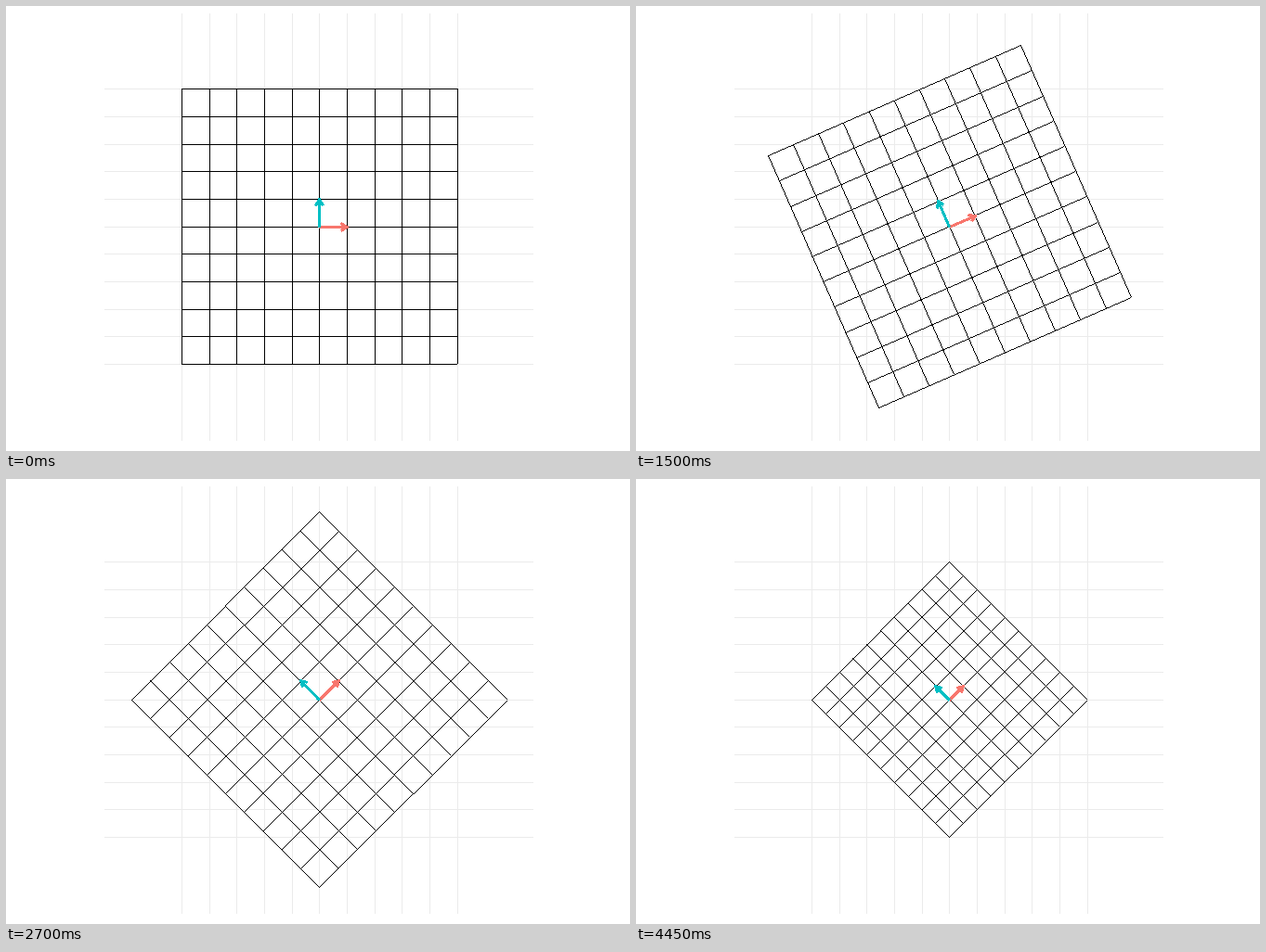
These frames come from a looping animation (672 by 480 pixels, 5000 ms). A matplotlib script:

```python
import numpy as np
import matplotlib.pyplot as plt
from matplotlib.animation import FuncAnimation
from matplotlib.patches import PathPatch
from matplotlib.path import Path

W, H = 672, 480
FRAMES, INTERVAL = 100, 50
CENTER = np.array([337.83, 238.17])
UNIT = 29.678            # pixels per grid unit
HEAD = 7.56              # arrow head arm length in pixels
REACH = 5                # grid runs from -REACH to REACH
STEPS = 40               # frames per motion phase

fig = plt.figure(figsize=(W / 96, H / 96), dpi=96, facecolor="white")
ax = fig.add_axes([0, 0, 1, 1])
ax.set(xlim=(0, W), ylim=(H, 0))
ax.axis("off")


def layer(color):
    patch = PathPatch(Path([(0, 0)]), facecolor=color, edgecolor="none",
                      linewidth=0, snap=False)
    return ax.add_patch(patch)


def squares(pixels):
    """Path made of one unit square per pixel."""
    corners = np.array([(0, 0), (1, 0), (1, 1), (0, 1)])
    quads = np.asarray(pixels)[:, None, :] + corners
    return Path.make_compound_path_from_polys(quads.astype(float))


def thin_line(a, b):
    """Pixels of a crisp one pixel line; the end pixel is left out."""
    n = int(np.abs(b - a).max())
    t = np.arange(n)[:, None] / n
    return np.floor(a + (b - a) * t + 0.5)


def thick_line(points, radius=1.5):
    """Pixels of a crisp thick polyline with butt ends and round joins."""
    low = np.min(points, axis=0).astype(int) - 3
    high = np.max(points, axis=0).astype(int) + 4
    xs, ys = np.meshgrid(np.arange(low[0], high[0]), np.arange(low[1], high[1]))
    cells = np.column_stack([xs.ravel(), ys.ravel()])
    hit = np.zeros(len(cells), bool)
    for a, b in zip(points, points[1:]):
        length = np.hypot(*(b - a))
        ux, uy = (b - a) / length
        dx, dy = (cells - a).T
        along, across = dx * ux + dy * uy, dy * ux - dx * uy
        hit |= (np.abs(across) < radius) & (along >= 0) & (along <= length)
    for p in points[1:-1]:
        hit |= np.hypot(*(cells - p).T) < radius
    return cells[hit]


def rotation(angle):
    c, s = np.cos(angle), np.sin(angle)
    return np.array([[c, -s], [s, c]])


def to_screen(point, matrix):
    x, y = matrix @ point
    return np.floor(CENTER + UNIT * np.array([x, -y]))


def transform(frame):
    """First a turn by 45 degrees, then a shrink by the root of two."""
    u = (frame - 9) / STEPS if frame > 10 else 0
    turn = np.pi / 4 * min(u, 1)
    shrink = np.clip(u - 1, 0, 1)
    return rotation(turn) * (1 - (1 - np.sqrt(0.5)) * shrink)


def grid_path(matrix):
    lines = []
    for g in range(-REACH, REACH + 1):
        for a, b in (((-REACH, g), (REACH, g)), ((g, REACH), (g, -REACH))):
            lines.append(thin_line(to_screen(a, matrix), to_screen(b, matrix)))
    return squares(np.concatenate(lines))


def arrow_path(axis, matrix):
    start, tip = to_screen((0, 0), matrix), to_screen(axis, matrix)
    x, y = matrix @ axis
    back = -HEAD * np.array([x, -y]) / np.hypot(x, y)
    arms = [np.floor(tip + rotation(k * np.pi / 6) @ back + 0.5) for k in (1, -1)]
    shaft = thick_line([start, tip])
    head = thick_line([arms[0], tip, arms[1]])
    return squares(np.concatenate([shaft, head]))


def backdrop_path():
    lines = []
    for g in range(-REACH, REACH + 1):
        x, y = np.floor(CENTER + UNIT * g)
        lines.append(thin_line(np.array([x, 8]), np.array([x, 469])))
        lines.append(thin_line(np.array([106, y]), np.array([568, y])))
    return squares(np.concatenate(lines))


backdrop = layer("#EBEBEB")
backdrop.set_path(backdrop_path())
grid = layer("black")
arrows = [(layer("#F8766D"), (1, 0)), (layer("#00BFC4"), (0, 1))]


def update(frame):
    matrix = transform(frame)
    grid.set_path(grid_path(matrix))
    for patch, axis in arrows:
        patch.set_path(arrow_path(axis, matrix))
    return [grid] + [patch for patch, _ in arrows]


anim = FuncAnimation(fig, update, frames=FRAMES, interval=INTERVAL,
                     repeat=True, repeat_delay=0, blit=False)
plt.show()
```
